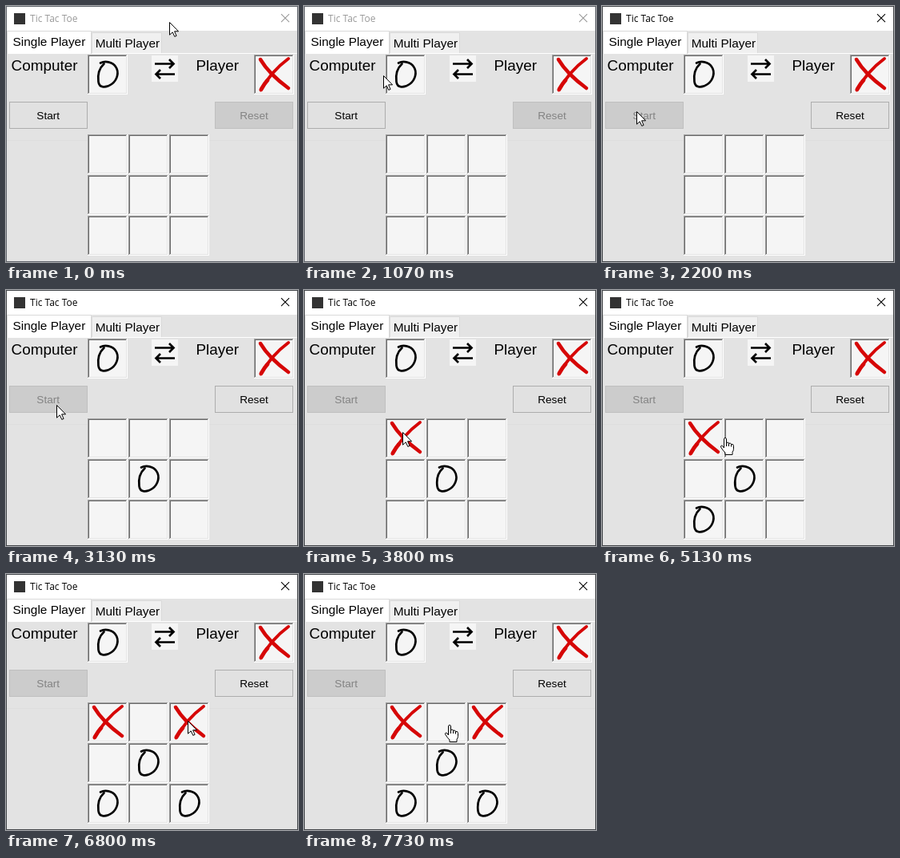
An HTML page that plays this animation: 365 by 321 pixels, repeating every 8 s.

```html
<!DOCTYPE html>
<html lang="en">
<head>
<meta charset="utf-8">
<title>Tic Tac Toe</title>
<style>
  html, body { margin: 0; width: 100%; height: 100%; overflow: hidden; background: #e3e3e3; }
  svg { display: block; }
  text { font-family: "Liberation Sans", Arial, sans-serif; white-space: pre; }
  .title { font: 12px "Open Sans", "Noto Sans", sans-serif; }
  .tab { font-size: 15.4px; }
  .label { font-size: 18.9px; }
  .button { font-size: 13.6px; text-anchor: middle; }
</style>
</head>
<body>
<svg id="stage" width="365" height="321" viewBox="0 0 365 321">
  <defs>
    <g id="cell">
      <rect width="50" height="50" fill="#fff"/>
      <path d="M0 0H49V1H1V49H0Z" fill="#a0a0a0"/>
      <rect x="1" y="1" width="48" height="48" fill="#e3e3e3"/>
      <path d="M1 1H48V2H2V48H1Z" fill="#696969"/>
      <rect x="2" y="2" width="46" height="46" fill="#f5f5f5"/>
    </g>
    <path id="O" d="M16 10.5C22 7.5 31 9 35 15C40 22 37 32 30 37C23 42 14.5 42 13.5 34C12.5 26 14.5 17 20.5 11.5"
      fill="none" stroke="#000" stroke-width="2.7" stroke-linecap="round" stroke-linejoin="round"/>
    <g id="X" fill="none" stroke="#d60606" stroke-linecap="round">
      <path d="M8 6Q18.5 24 43 42" stroke-width="4.5"/>
      <path d="M43 5Q21.5 21 8.5 44.5" stroke-width="4"/>
      <path d="M17 32Q13 36 9 43.5" stroke-width="4.8"/>
    </g>
  </defs>

  <rect width="365" height="321" fill="#e3e3e3"/>
  <rect width="365" height="31" fill="#fff"/>
  <rect x="10" y="9" width="14" height="14" fill="#333"/>
  <g id="caption">
    <text class="title" x="30" y="20">Tic Tac Toe</text>
    <path d="M344 10.2l10 10m0-10l-10 10" fill="none" stroke-width="1.1"/>
  </g>

  <path d="M107.5 59V33.5H194.5V59" fill="#f0f0f0" stroke="#d9d9d9"/>
  <path d="M1 59.5H364" stroke="#fff"/>
  <path d="M1.5 60V31.5H106.5V60" fill="#fff" stroke="#d9d9d9"/>
  <text class="tab" x="8.6" y="50">Single Player</text>
  <text class="tab" x="111.7" y="52">Multi Player</text>

  <path d="M1 168.5H102M254 168.5H364" stroke="#dedede"/>
  <text class="label" x="6.5" y="81">Computer</text>
  <text class="label" x="237.5" y="81">Player</text>
  <use href="#cell" x="102" y="61"/><use href="#O" x="102" y="61"/>
  <use href="#cell" x="310" y="61"/><use href="#X" x="310" y="61"/>
  <rect x="182" y="62" width="33" height="33" fill="#f5f5f5"/>
  <path d="M186 72.5H209M204 67l5.5 5.5L204 78M211 85.5H188M193 80l-5.5 5.5L193 91"
    fill="none" stroke="#000" stroke-width="2.7"/>

  <g id="start"><rect x="4.5" y="120.5" width="97" height="33"/><text class="button" x="52.7" y="142">Start</text></g>
  <g id="reset"><rect x="261.5" y="120.5" width="97" height="33"/><text class="button" x="310" y="142">Reset</text></g>
  <g id="board"></g>
  <rect id="frame" x=".5" y=".5" width="364" height="320" fill="none"/>

  <path id="arrow" d="M.5 .5V16.2L4.2 12.8L6.8 18.4L9.1 17.4L6.6 11.8H11.6Z" fill="#fff" stroke="#000"/>
  <g id="hand" stroke="#000" stroke-linejoin="round">
    <path d="M-1.5 13V1.8Q-1.5 .5 0 .5Q1.5 .5 1.5 1.8V6.5Q4.3 5.2 4.5 7.3Q7.2 6.3 7.5 8.5Q10.5 7.8 10.5 10.5V14.5Q10.5 16 9 18.5V21.5H0V19Q-3 16 -5.3 12.2Q-6 10.3 -4.3 10.1Q-3 10.2 -1.5 13Z" fill="#fff"/>
    <path d="M1.5 6.5V11M4.5 7.3V11M7.5 8.5V11.5" fill="none"/>
  </g>
</svg>
<script>
const LOOP = 8000, FPS = 15;
const $ = id => document.getElementById(id);
const SVG = 'http://www.w3.org/2000/svg';

// All times below are counted in ticks of 1/15 s.
const PATH = [
  [6, 204, 20], [16, 99, 87], [19, 73, 106], [23, 44, 131], [33, 43, 131.5], [45, 43, 131.5],
  [46, 50, 136], [49, 88, 159], [51, 116, 175], [52, 123, 178], [73, 123, 178],
  [75, 133, 181], [79, 174, 188], [83, 213, 189], [86, 227.5, 184], [108, 227, 184],
  [110, 213, 190], [111, 213, 190], [114, 191, 190], [116, 182, 189]
];
// "blocked" is when the pointer over the taken cell turns back into an arrow.
const MOVES = [
  { mark: 'O', col: 1, row: 1, at: 41, blocked: 41 },
  { mark: 'X', col: 0, row: 0, at: 56, blocked: 57 },
  { mark: 'O', col: 0, row: 2, at: 69, blocked: 69 },
  { mark: 'X', col: 2, row: 0, at: 88, blocked: 88 },
  { mark: 'O', col: 2, row: 2, at: 102, blocked: 102 }
];
// Fill, border and text colours.
const NORMAL = [[225, 225, 225], [173, 173, 173], [0, 0, 0]];
const HOVER = [[229, 241, 251], [0, 120, 215], [0, 0, 0]];
const PRESSED = [[204, 228, 247], [0, 84, 153], [0, 0, 0]];
const DISABLED = [[204, 204, 204], [191, 191, 191], [131, 131, 131]];
const START = [[21, NORMAL], [25, HOVER], [26, PRESSED], [27, PRESSED], [31, DISABLED]];
const RESET = [[28, DISABLED], [33, NORMAL]];
const ACTIVATE = 26;

const LEFT = 102, TOP = 161, PITCH = 51, SIZE = 50;
const mix = (a, b, p) => a + (b - a) * p;

function use(id, col, row) {
  const node = document.createElementNS(SVG, 'use');
  node.setAttribute('href', '#' + id);
  node.setAttribute('x', LEFT + col * PITCH);
  node.setAttribute('y', TOP + row * PITCH);
  return $('board').appendChild(node);
}

for (let i = 0; i < 9; i++) use('cell', i % 3, Math.floor(i / 3));
for (const move of MOVES) move.node = use(move.mark, move.col, move.row);

// Finds the two keys around a tick and the progress between them.
function between(keys, tick) {
  if (tick <= keys[0][0]) return [keys[0], keys[0], 0];
  const i = keys.findIndex(key => key[0] >= tick);
  if (i < 0) return [keys.at(-1), keys.at(-1), 0];
  const a = keys[i - 1], b = keys[i];
  return [a, b, (tick - a[0]) / (b[0] - a[0])];
}

function paintButton(id, keys, tick) {
  const [a, b, p] = between(keys, tick);
  const [fill, border, ink] = a[1].map((colour, i) =>
    `rgb(${colour.map((v, c) => Math.round(mix(v, b[1][i][c], p)))})`);
  const [box, label] = $(id).children;
  box.setAttribute('fill', fill);
  box.setAttribute('stroke', border);
  label.setAttribute('fill', ink);
}

function overFreeCell(x, y, tick) {
  const dx = x - LEFT, dy = y - TOP;
  const col = Math.floor(dx / PITCH), row = Math.floor(dy / PITCH);
  if (col < 0 || col > 2 || row < 0 || row > 2) return false;
  if (dx % PITCH >= SIZE || dy % PITCH >= SIZE) return false;
  return !MOVES.some(m => m.col === col && m.row === row && tick >= m.blocked);
}

function render(ms) {
  const tick = Math.floor(((ms % LOOP) + 4) * FPS / 1000) % (LOOP * FPS / 1000);
  const active = tick >= ACTIVATE;
  const ink = active ? '#000' : '#999';
  $('caption').setAttribute('fill', ink);
  $('caption').lastElementChild.setAttribute('stroke', ink);
  $('frame').setAttribute('stroke', active ? '#44474b' : '#62666d');
  paintButton('start', START, tick);
  paintButton('reset', RESET, tick);
  for (const move of MOVES) move.node.style.display = tick >= move.at ? '' : 'none';

  const [a, b, p] = between(PATH, tick);
  const x = Math.round(mix(a[1], b[1], p)), y = Math.round(mix(a[2], b[2], p));
  const pointing = overFreeCell(x, y, tick);
  for (const id of ['arrow', 'hand']) {
    $(id).setAttribute('transform', `translate(${x} ${y})`);
    $(id).style.display = (id === 'hand') === pointing ? '' : 'none';
  }
}

const origin = performance.now();
function loop() {
  render(performance.now() - origin);
  requestAnimationFrame(loop);
}
loop();
</script>
</body>
</html>
```
